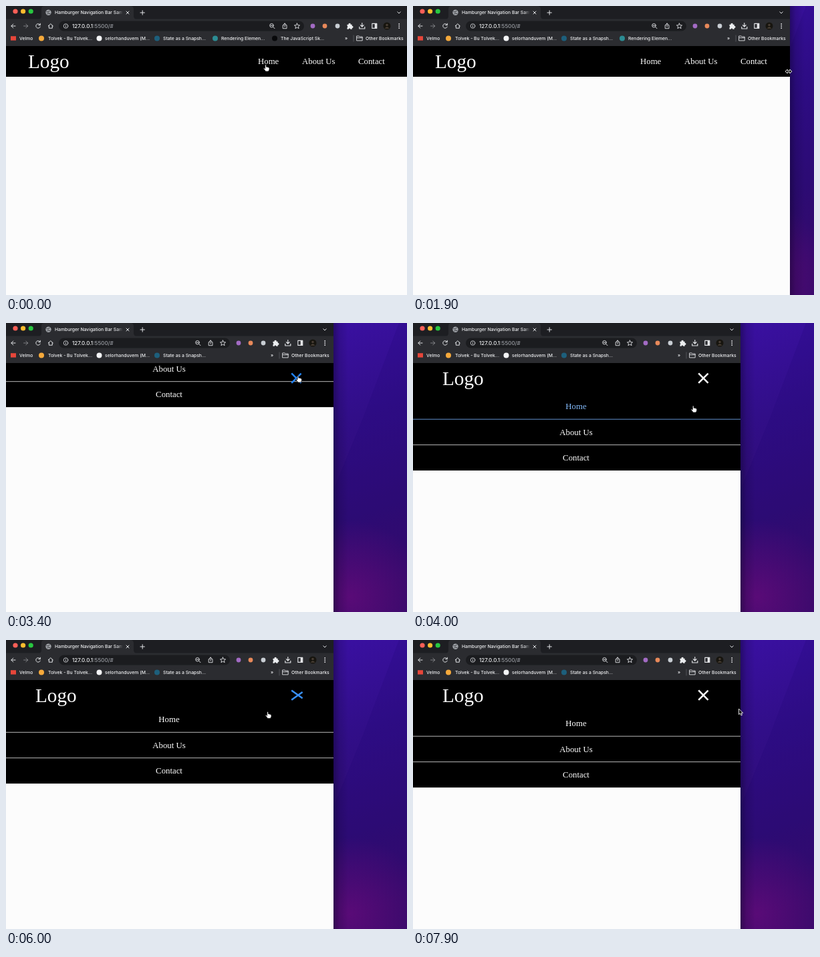
Recreate the animation shown at these times as an HTML page. Size 600 by 433 pixels, loop 8000 ms.

```html
<!DOCTYPE html>
<html lang="en">
<head>
<meta charset="utf-8">
<title>Responsive navigation</title>
<style>
  html, body { margin: 0; width: 100%; height: 100%; overflow: hidden; background: #fcfcfc; }
  svg { display: block; width: 600px; height: 433px; }
  .ui { font-family: Inter, Roboto, sans-serif; font-size: 6.8px; font-weight: 500; fill: #f1f2f4; }
  .url { font-size: 8px; }
  .page { font-family: "Liberation Serif", "Times New Roman", serif; font-size: 12.8px; fill: #fff; }
  .logo { font-size: 29.2px; }
  .line { fill: none; stroke: #e2e4e7; stroke-linecap: round; stroke-linejoin: round; }
</style>
</head>
<body>
<svg viewBox="0 0 600 433">
  <defs>
    <linearGradient id="sky" x1="0" y1="0" x2="0.1" y2="1">
      <stop offset="0" stop-color="#3a10a2"/>
      <stop offset="0.35" stop-color="#310e88"/>
      <stop offset="0.7" stop-color="#300c74"/>
      <stop offset="1" stop-color="#3a0b68"/>
    </linearGradient>
    <radialGradient id="glow" gradientUnits="userSpaceOnUse" cx="515" cy="410" r="115">
      <stop offset="0" stop-color="#620b7a" stop-opacity="0.8"/>
      <stop offset="1" stop-color="#620b7a" stop-opacity="0"/>
    </radialGradient>
    <linearGradient id="shade">
      <stop offset="0" stop-color="#08021c" stop-opacity="0.4"/>
      <stop offset="0.4" stop-color="#08021c" stop-opacity="0.14"/>
      <stop offset="1" stop-color="#08021c" stop-opacity="0"/>
    </linearGradient>
    <linearGradient id="tabFade">
      <stop offset="0" stop-color="#2b2c30" stop-opacity="0"/>
      <stop offset="1" stop-color="#2b2c30"/>
    </linearGradient>
    <clipPath id="winClip"><rect id="winBox" height="433"/></clipPath>
    <clipPath id="pageClip"><rect y="60" width="600" height="373"/></clipPath>
    <clipPath id="titleClip"><rect x="72" width="103" height="20"/></clipPath>
  </defs>

  <g id="wallpaper">
    <rect x="480" width="120" height="433" fill="url(#sky)"/>
    <path d="M600 0H588L535 140 490 250V433H600Z" fill="#220775" opacity="0.2"/>
    <rect x="480" width="120" height="433" fill="url(#glow)"/>
    <rect id="shadow" width="22" height="433" fill="url(#shade)"/>
  </g>

  <g clip-path="url(#winClip)">
    <rect width="601" height="433" fill="#fcfcfc"/>
    <rect width="601" height="20" fill="#1d1e22"/>
    <rect y="19.5" width="601" height="40.5" fill="#2b2c30"/>
    <path d="M48 20Q53 20 53 15V5Q53 0 58 0H186Q191 0 191 5V15Q191 20 196 20Z" fill="#2b2c30"/>
    <circle cx="14" cy="8" r="3.6" fill="#ff5f57"/>
    <circle cx="25.6" cy="8" r="3.6" fill="#febc2e"/>
    <circle cx="37.2" cy="8" r="3.6" fill="#28c840"/>
    <circle cx="63.5" cy="9.7" r="4.2" fill="#9fa2a7"/>
    <path d="M60.5 8.5l3 .7 1.6-2.4M61.5 12l2-.8 2.8 .3" fill="none" stroke="#34363a"/>
    <g class="ui">
      <text x="73" y="12.3" clip-path="url(#titleClip)">Hamburger Navigation Bar Sample</text>
      <rect x="166" y="3" width="9" height="14" fill="url(#tabFade)"/>
    </g>
    <path class="line" d="M180 8l4 4m0-4l-4 4M201 10h6.4M204.2 6.8v6.4"/>
    <path class="line" d="M14 30H8m2.8-3L7.8 30l3 3"/>
    <path class="line" d="M26.5 30h6m-2.8-3l3 3-3 3" opacity="0.45"/>
    <path class="line" d="M51 28.3a3.3 3.3 0 1 0 .2 2.8M51.3 26.2v2.4h-2.5M63.2 30l3.6-3.3 3.6 3.3M64.3 29.4v3.8h5v-3.8"/>
    <rect id="omnibox" x="79" y="22.5" height="15" rx="7.5" fill="#1b1c1f"/>
    <circle cx="89.5" cy="30" r="3.3" class="line" stroke-width="0.8"/>
    <path class="line" d="M89.5 29.8v1.8M89.5 28.3v.1" stroke-width="0.8"/>
    <text class="ui url" x="99" y="32.9">127.0.0.1<tspan fill="#9a9da3">:5500/#</tspan></text>
    <g id="bookmarks" class="ui"></g>

    <g id="rightTools">
      <path class="line" d="M585.8 8.8l2.2 2.3 2.2-2.3M399.8 31.5l2.2 2.2M396 29.2h3"/>
      <circle class="line" cx="397.5" cy="29.2" r="2.8" stroke-width="0.9"/>
      <path class="line" d="M415.5 28.7h-1.3v5h5.8v-5h-1.3M417.1 31.3v-5.3m-1.7 1.6l1.7-1.7 1.7 1.7" stroke-width="0.9"/>
      <path class="line" d="M435.5 26l1.2 2.7 2.9.2-2.2 1.9.7 2.9-2.6-1.6-2.6 1.6.7-2.9-2.2-1.9 2.9-.2Z" stroke-width="0.9"/>
      <circle cx="459" cy="30" r="3.4" fill="#a36bc4"/>
      <circle cx="477" cy="30" r="3.4" fill="#e8895a"/>
      <circle cx="496" cy="30" r="3.4" fill="#c9ced4"/>
      <path d="M510.5 27.8h2.2a1.5 1.5 0 1 1 2.8 0h2.2v2.3a1.4 1.4 0 1 1 0 2.7v1.9h-2.4a1.3 1.3 0 0 0-2.6 0h-2.2v-2.4a1.3 1.3 0 0 0 0-2.4Z" fill="#eceef0"/>
      <path class="line" d="M532.8 25.5v5.3m-2.4-2.2l2.4 2.4 2.4-2.4M528.8 31.3v2.7h8v-2.7" stroke-width="1.2"/>
      <rect class="line" x="547.8" y="26.4" width="7" height="7" stroke-width="1.1"/>
      <rect x="551.7" y="26.4" width="3.2" height="7" fill="#e4e5e8"/>
      <circle cx="570" cy="30" r="5.5" fill="#17150f"/>
      <circle cx="570" cy="28.4" r="1.7" fill="#4a3f35"/>
      <path d="M566.5 33.8q3.5-5.2 7 0Z" fill="#4a3f35"/>
      <g fill="#e4e5e8"><circle cx="588.2" cy="27" r="0.9"/><circle cx="588.2" cy="30" r="0.9"/><circle cx="588.2" cy="33" r="0.9"/></g>
      <text class="ui" x="507" y="50.5">»</text>
      <path d="M520 43.5v10" stroke="#5b5d62" stroke-width="0.8"/>
      <path class="line" d="M525 45h3.2l1 1.1h4v5.8H525ZM525 47.7h8.2" stroke-width="0.9"/>
      <text class="ui" x="538" y="50.8">Other Bookmarks</text>
    </g>

    <g class="page" clip-path="url(#pageClip)">
      <rect y="60" width="601" height="46" fill="#000"/>
      <text id="logo" class="logo" y="92.8">Logo</text>
      <g id="wideNav"></g>
      <g id="menu"><rect y="106" width="601" height="115" fill="#000"/></g>
      <g id="icon" stroke-width="2.5"></g>
    </g>
  </g>

  <g id="cursors" stroke-linejoin="round">
    <path id="hand" d="M-.9 .5Q0-.6 .9 .5V3.3L2 3.1 2.7 3.7 3.8 3.6 4.3 4.2Q5.6 4 5.5 5.4V7Q5.3 8.4 4.4 9.2V10H-.5V9.2L-3 6Q-3.5 4.8-2.4 4.7L-.9 6Z" fill="#fff" stroke="#111" stroke-width="0.8"/>
    <path id="arrow" d="M0 0V8.6L2 6.9 3.5 10 5 9.3 3.6 6.3H6.2Z" fill="#0a0a0a" stroke="#fff" stroke-width="0.85"/>
    <path id="resize" d="M-5 0L-1.8-3V-1.1H1.8V-3L5 0 1.8 3V1.1H-1.8V3Z" fill="#0a0a0a" stroke="#fff" stroke-width="0.85"/>
  </g>
</svg>
<script>
const LOOP = 8000, STEP = 100, FULL = 601;
const BLUE = [34, 132, 250];
const $ = id => document.getElementById(id);
const clamp = x => Math.max(0, Math.min(1, x));
const smooth = x => { x = clamp(x); return x * x * (3 - 2 * x); };
const set = (el, attrs) => { for (const k in attrs) el.setAttribute(k, attrs[k]); };
const show = (el, on) => set(el, { visibility: on ? 'visible' : 'hidden' });

function add(parent, tag, attrs, text) {
  const el = document.createElementNS('http://www.w3.org/2000/svg', tag);
  set(el, attrs);
  if (text) el.textContent = text;
  return parent.appendChild(el);
}

// label, text x, icon x, icon colour, right end
const bookmarks = [
  ['Velmo', 20, 11, '#e6463a', 40],
  ['Tolvek - Bu Tolvek...', 63, 53, '#f5a93b', 126],
  ['selorhanduvem (M...', 148, 139.5, '#f4f5f6', 212],
  ['State as a Snapsh...', 235, 226, '#1d5f7c', 299],
  ['Rendering Elemen...', 322, 313, '#2c8c93', 387],
  ['The JavaScript Sk...', 411, 402, '#08090b', 476]
].map(([label, x, iconX, fill, end], i) => {
  const el = add($('bookmarks'), 'g', {});
  if (i) add(el, 'circle', { cx: iconX, cy: 48.4, r: 4, fill });
  else add(el, 'rect', { x: iconX - 4, y: 45.2, width: 8, height: 6.4, fill });
  add(el, 'text', { x, y: 50.8 }, label);
  return { el, end };
});

const labels = ['Home', 'About Us', 'Contact'];
const wideLinks = labels.map((s, i) => add($('wideNav'), 'text', { x: [377, 443, 527][i], y: 87.2 }, s));
const menuLinks = labels.map((s, i) => add($('menu'), 'text', { y: 129.2 + i * 38.5, 'text-anchor': 'middle' }, s));
const rules = [144.2, 182.6].map(y => add($('menu'), 'path', { d: `M0 ${y}H601`, 'stroke-width': 0.9 }));
const bars = [-1, 0, 1].map(() => add($('icon'), 'path', { d: 'M-.6 0H19.6' }));

// hover spans in ms
const wideHover = [[[10, 330]], [[340, 640]], [[650, 940]]];
const menuHover = [[[3900, 4400]], [[4450, 5150]], []];
const iconHover = [[3080, 3600], [5200, 5980], [6150, 6850]];

// start, duration, end value
const menuMoves = [[3224, 400, 1], [5250, 380, 0], [5646, 400, 1], [6150, 380, 0], [6546, 400, 1]];
const iconMoves = [[3100, 280, 1], [5250, 380, 0], [5646, 500, 1], [6150, 380, 0], [6546, 500, 1]];

const widthKeys = [[1600, 601], [1700, 600], [1900, 564], [2300, 490]];
const pointerKeys = [
  [0, 388.5, 88], [400, 466, 87], [800, 549, 87], [900, 566, 88], [1300, 599, 98],
  [2400, 488, 98], [3050, 438, 80], [3400, 437, 79], [3900, 420, 118], [4400, 416, 148],
  [5000, 414.5, 183], [5230, 435, 81], [5700, 435, 81], [6000, 391.5, 107.5],
  [6150, 434, 82], [6600, 434, 82], [6900, 395.5, 97], [7300, 408, 99], [7900, 487.5, 103]
];
const pointerKinds = [[0, 'hand'], [950, 'arrow'], [1300, 'resize'], [2420, 'arrow'], [3050, 'hand'], [6830, 'arrow']];

function along(keys, t) {
  if (t <= keys[0][0]) return keys[0].slice(1);
  for (let i = 1; i < keys.length; i++) {
    const a = keys[i - 1], b = keys[i];
    if (t <= b[0]) {
      const k = (t - a[0]) / (b[0] - a[0]);
      return a.slice(1).map((v, j) => v + (b[j + 1] - v) * k);
    }
  }
  return keys[keys.length - 1].slice(1);
}

const moved = (moves, t) => moves.reduce((v, [start, time, to]) => v + (to - v) * smooth((t - start) / time), 0);
const glow = (spans, t) => spans.reduce((v, [on, off]) =>
  Math.max(v, clamp((t - on) / 180) * (1 - clamp((t - off) / 200))), 0);
const tint = (k, base = 255) => `rgb(${BLUE.map(c => Math.round(base + (c - base) * k))})`;

function draw(t) {
  const [w] = along(widthKeys, t);
  const narrow = w < 492, shift = w - FULL;
  set($('winBox'), { width: w });
  set($('shadow'), { x: w });
  show($('wallpaper'), w < 600);
  set($('omnibox'), { width: w - 155 - 79 });
  for (const id of ['rightTools', 'wideNav']) set($(id), { transform: `translate(${shift})` });
  bookmarks.forEach(b => show(b.el, b.end + 14 <= w - 91));

  set($('logo'), { x: narrow ? 44 : 33 });
  show($('wideNav'), !narrow);
  show($('menu'), narrow);
  show($('icon'), narrow);
  wideLinks.forEach((el, i) => set(el, { fill: tint(glow(wideHover[i], t)) }));

  set($('menu'), { transform: `translate(0 ${-161 * (1 - moved(menuMoves, t))})` });
  menuLinks.forEach((el, i) => set(el, { x: w / 2 - 1, fill: tint(glow(menuHover[i], t)) }));
  rules.forEach((el, i) => set(el, { stroke: tint(glow(menuHover[i], t), 205) }));

  // the outer bars pivot on their left ends to form the cross
  const turn = moved(iconMoves, t);
  set($('icon'), { transform: `translate(${w - 62.3} 82.7)`, stroke: tint(glow(iconHover, t)) });
  bars.forEach((el, i) => set(el, {
    transform: `translate(0 ${(i - 1) * 6.8}) rotate(${(1 - i) * 45 * turn})`,
    opacity: i === 1 ? 1 - clamp(turn / 0.8) : 1
  }));

  let [x, y] = along(pointerKeys, t), kind;
  for (const [from, name] of pointerKinds) if (t >= from) kind = name;
  if (kind === 'resize') { x = w - 2; y = 98; }
  set($('cursors'), { transform: `translate(${x} ${y})` });
  for (const name of ['hand', 'arrow', 'resize']) show($(name), name === kind);
}

const began = performance.now();
function tick() {
  const t = (performance.now() - began) % LOOP;
  draw(Math.floor(t / STEP) * STEP);
  requestAnimationFrame(tick);
}
tick();
</script>
</body>
</html>
```
